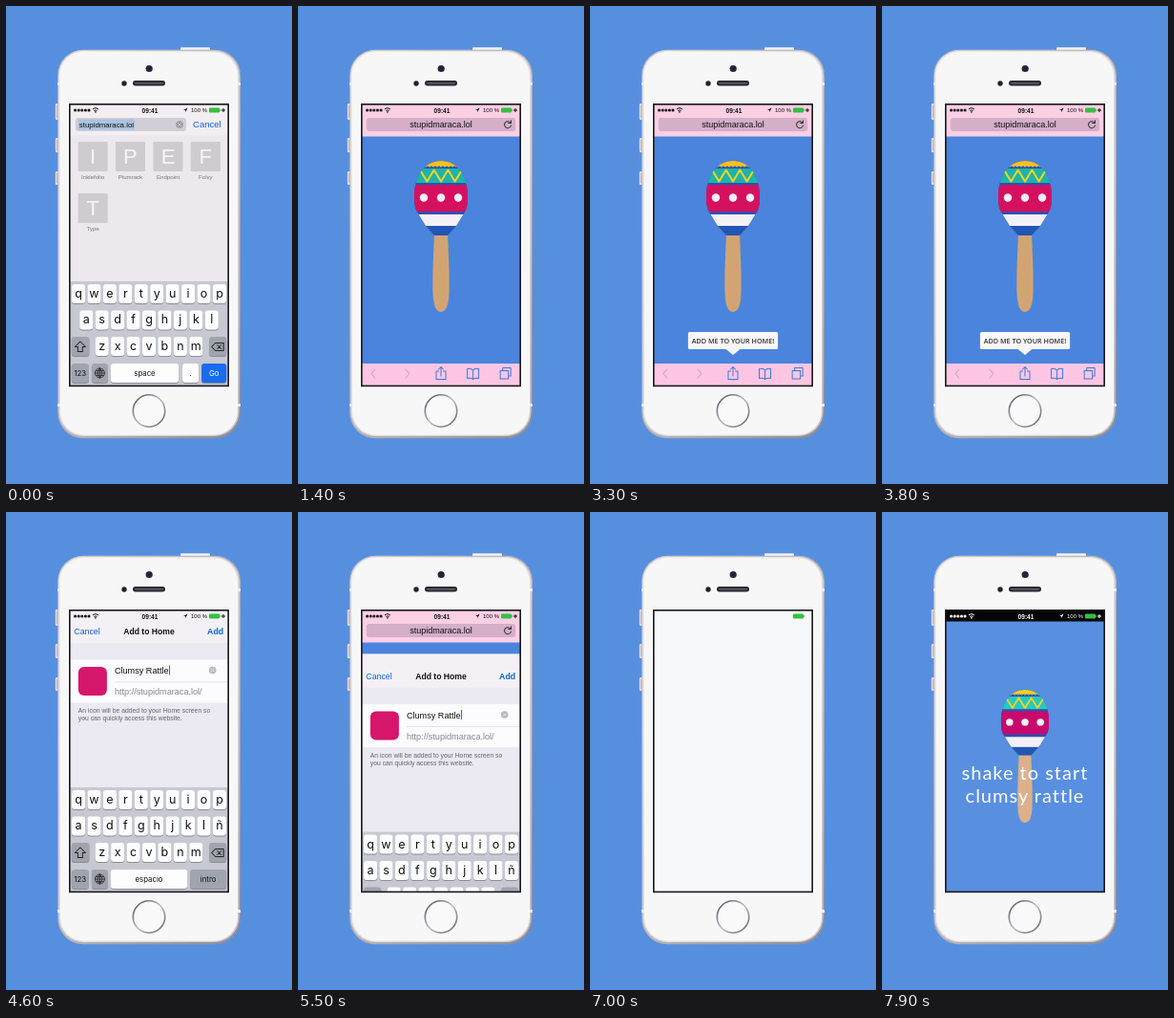
Write an HTML page that moves like this. It is 300 px wide and 500 px high and loops after 8 s.

```html
<!DOCTYPE html>
<html lang="en">
<head>
<meta charset="utf-8">
<title>Add to home</title>
<style>
html, body { margin: 0; width: 100%; height: 100%; overflow: hidden; background: #578fdf; }
svg { display: block; width: 300px; height: 500px; }
text { font-family: "Liberation Sans", Arial, sans-serif; white-space: pre; }
.mid { text-anchor: middle; }
.line { fill: none; stroke: currentColor; stroke-linecap: round; stroke-linejoin: round; }
.key { font-family: Inter, sans-serif; }
.tip { font: 600 7.2px "Open Sans", sans-serif; }
.hand { font: 20px Lato, sans-serif; letter-spacing: 1px; }
</style>
</head>
<body>
<svg id="stage" viewBox="0 0 300 500"></svg>
<script>
const box = (x, y, w, h, fill, r = 0) =>
  `<rect x="${x}" y="${y}" width="${w}" height="${h}" rx="${r}" fill="${fill}"/>`;
const dot = (x, y, r, fill) => `<circle cx="${x}" cy="${y}" r="${r}" fill="${fill}"/>`;
const path = (d, fill) => `<path d="${d}" fill="${fill}"/>`;
const line = (d, color, width = 1) =>
  `<path class="line" d="${d}" color="${color}" stroke-width="${width}"/>`;
const text = (s, x, y, size, fill = '#111', more = '') =>
  `<text x="${x}" y="${y}" font-size="${size}" fill="${fill}" ${more}>${s}</text>`;
const mid = (s, x, y, size, fill, more = '', kind = '') =>
  text(s, x, y, size, fill, `class="mid ${kind}" ${more}`);
const group = (id, body) => `<g id="${id}">${body}</g>`;
const each = (list, draw) => [...list].map(draw).join('');

const bold = 'font-weight="700"';
const site = 'stupidmaraca.lol';
const iconColor = '#d5166b', browserColor = '#2a86de';
const cols = [91.3, 130.5, 170, 209.2];

function zigzag(x0, x1, top, bottom, step) {
  let d = '';
  for (let x = x0, i = 0; x <= x1; x += step, i++) d += `${i ? 'L' : 'M'}${x} ${i % 2 ? bottom : top}`;
  return d;
}

function clearButton(x, y, fill) {
  return dot(x, y, 3.8, fill) +
    line(`M${x - 1.4} ${y - 1.4}l2.8 2.8m0 -2.8l-2.8 2.8`, '#f2eff3', .8);
}

function keyboard(rows, spaceLabel, spaceEnd, lastKeys) {
  const cap = (x, y, w, fill = '#fdfdfe') =>
    box(x, y + 1, w, 20, '#8b8e97', 3) + box(x, y, w, 20, fill, 3);
  const label = (s, x, y, size, fill) => mid(s, x, y, size, fill, '', 'key');
  const gray = '#a0a4ae';
  return box(66, 288, 168, 110, '#c7c8d1') +
    rows.map((row, r) => each(row, (c, i) => {
      const x = 150 + (i - (row.length - 1) / 2) * 16.4, y = 291 + r * 27.5;
      return cap(x - 7, y, 14) + label(c, x, y + 14, 12.5);
    })).join('') +
    cap(69, 346, 18.5, gray) + line('M78 351l-5.5 5.5h3v5h5v-5h3z', '#222') +
    cap(213, 346, 18, gray) +
    line('M215.5 356.5l4 -4h8.5v8h-8.5zm6 -2l4 4m0 -4l-4 4', '#222') +
    cap(69, 374, 18, gray) + label('123', 78, 387, 7.8) +
    cap(90, 374, 17, gray) +
    line('M93.5 384a5 5 0 1 0 10 0a5 5 0 1 0 -10 0h10M98.5 379v10M98.5 379q-5 5 0 10q5 -5 0 -10M94.5 381.5h8m-8 5h8', '#222', .8) +
    cap(110, 374, spaceEnd - 110) + label(spaceLabel, (110 + spaceEnd) / 2, 387, 7.8) +
    lastKeys.map(([s, x, w, fill, ink]) =>
      cap(x, 374, w, fill || gray) + label(s, x + w / 2, 387, 7.8, ink)).join('');
}

function maraca(cap, teal, pink, wood) {
  return path('M143 238H157C158 262 159 280 158.5 300C158 314 155 320 150 320S142 314 141.5 300C141 280 142 262 143 238Z', wood) +
    '<g clip-path="url(#egg)">' +
    box(120, 160, 60, 82, '#2355b5') +
    box(120, 160, 60, 7, cap) +
    line(zigzag(128, 172, 166.5, 168, 2), cap) +
    box(120, 170, 60, 15, teal) +
    line(zigzag(128.1, 172, 171.5, 183.5, 7.3), '#f5d321', 2) +
    box(120, 188, 60, 26, pink) +
    line(zigzag(121, 180, 187, 188.5, 2), pink) +
    line(zigzag(121, 180, 214, 215.5, 2), pink) +
    each([132, 150, 168], x => dot(x, 200.5, 4.2, '#f6f0f4')) +
    box(120, 218, 60, 12, '#f3f1f6') + '</g>';
}

const status =
  each([0, 1, 2, 3, 4], i => dot(72.6 + i * 3.6, 109, 1.55, 'currentColor')) +
  '<path class="line" d="M91.2 107.6q2.7 -2.2 5.4 0M92.6 109.3q1.3 -1 2.6 0" stroke-width="1"/>' +
  dot(93.9, 110.9, .8, 'currentColor') +
  mid('09:41', 151, 111.5, 6.6, 'currentColor', bold) +
  path('M190.5 106.5l-4.5 2.5h2.3v2.3z', 'currentColor') +
  text('100 %', 194, 111.3, 6, 'currentColor') +
  path('M227.5 107h1v1.5h1.5v1h-1.5v1.5h-1v-1.5h-1.5v-1h1.5z', 'currentColor');

const reload = line('M223 122.5a3.5 3.5 0 1 0 .3 2.5M223.3 119.8v2.8h-2.8', '#333');

const loading = box(66, 102, 168, 296, '#fff') + box(66, 102, 168, 34, '#f1edf1') +
  box(72, 117, 156, 14, '#d8d4dc', 3) + mid(site, 150, 127, 9) + reload +
  '<rect id="progress" x="67" y="134.5" height="1.5" fill="#1a6ff0"/>';

const page = box(66, 102, 168, 296, '#4a84dc') +
  box(66, 102, 168, 34.5, '#fbcfe4') + box(72, 117, 156, 14, '#d5aec8', 3) +
  mid(site, 150, 127, 9) + reload +
  box(66, 374, 168, 24, '#ffc6e3') +
  line('M81 380l-4 4.5l4 4.5M113 380l4 4.5l-4 4.5', '#cb9fbd') +
  line('M147.5 382h-2.5v8.5h10v-8.5h-2.5M150 387v-9.5m-2.5 2.5l2.5 -2.5l2.5 2.5', '#3b78d6') +
  line('M177.5 379.5q4 -1 6 1.5q2 -2.5 6 -1.5v10q-4 -1 -6 1q-2 -2 -6 -1zM183.5 381v9.5', '#3b78d6') +
  line('M212 381.5h8.5v8.5h-8.5zM214.5 381v-2.5h8.5v8.5h-2.5', '#3b78d6') +
  maraca('#fbc01f', '#1fb3ab', '#d5115f', '#d3a473') +
  group('tip', box(103, 341, 94, 18, '#f8f7f8', 1.5) + path('M142 358.5H158L150 365Z', '#f8f7f8') +
    mid('ADD ME TO YOUR HOME!', 150, 352.7, 7.2, '#333', '', 'tip'));

const shortcuts = [['Inklefolio', 0, 0], ['Plumrack', 1, 0], ['Endpoint', 2, 0], ['Folvy', 3, 0], ['Type', 0, 1]];
const start = box(66, 102, 168, 296, '#ece8ee') + box(66, 102, 168, 33.5, '#f3eef2') +
  box(73, 117, 116, 14, '#d2ced7', 3) + box(76, 118.5, 59, 11, '#a9c3df') +
  text(site, 77, 127, 7.85) + clearButton(182, 124, '#9c9aa2') + text('Cancel', 196, 127.3, 9.5, '#0a62e0') +
  shortcuts.map(([name, c, r]) => {
    const x = cols[c], y = 142 + r * 54;
    return box(x - 15.5, y, 31, 31, '#cfcbd0', 1) + mid(name[0], x, y + 23.5, 22, '#f8f5f8') +
      mid(name, x, y + 39.5, 6.1, '#77747b');
  }).join('');
const startKeys = keyboard(['qwertyuiop', 'asdfghjkl', 'zxcvbnm'], 'space', 181,
  [['.', 185, 17, '#fdfdfe'], ['Go', 205, 26, '#176cf0', '#fff']]);

const sheet = box(71, 256, 158, 108, '#eeecf1', 4) +
  each([0, 1], r => each(cols, x => box(x - 13, 267 + r * 48, 26, 26, '#d4d2da', 6))) +
  box(71, 369, 158, 24, '#f8f7fa', 4) + mid('Cancel', 150, 384.5, 10, '#0a62e0');

const form = box(66, 102, 168, 296, '#ebe9f1') + box(66, 102, 168, 35, '#f4f1f6') +
  text('Cancel', 71.5, 128.5, 8.8, '#0b62d6') + mid('Add to Home', 150, 128.5, 8.6, '#111', bold) +
  text('Add', 228, 128.5, 8.8, '#0b62d6', `${bold} text-anchor="end"`) +
  box(66, 154.5, 168, 45, '#fcfbfd') + box(76, 162, 30, 30, iconColor, 6) +
  text('Clumsy Rattle', 114, 169, 9.1) + box(171, 160.5, 1, 10, '#2a63d8') + clearButton(216.5, 165.5, '#b9b7be') +
  box(114, 177.5, 120, .7, '#dddbe1') + text(`http://${site}/`, 114, 191.5, 9.1, '#88868e') +
  text('An icon will be added to your Home screen so', 76, 210.5, 6.8, '#66646b') +
  text('you can quickly access this website.', 76, 218.3, 6.8, '#66646b') +
  keyboard(['qwertyuiop', 'asdfghjklñ', 'zxcvbnm'], 'espacio', 190, [['intro', 193, 38]]);

const dock = [['Roamer'], ['Mail', '#166df0'], ['Keyring', '#a3a4aa'], ['Music', '#d0ced6']];
const home = box(60, 90, 180, 320, '#1d1b1f') + box(60, 340, 180, 70, '#252327') +
  dock.map(([name, fill], i) =>
    (fill ? box(cols[i] - 15.5, 353.5, 31, 31, fill, 7) : dot(cols[i], 369, 14.5, browserColor)) +
    mid(name, cols[i], 392, 5.8, '#eee')).join('') +
  '<circle class="line" cx="137.8" cy="336.2" r="1.4" color="#38363b" stroke-width=".7"/>' +
  line('M138.9 337.3l1.2 1.2', '#38363b', .7) +
  dot(146, 336.7, 1.9, '#302e33') + dot(154, 336.7, 1.9, '#48464b') + dot(162, 336.7, 1.9, '#302e33') +
  box(cols[0] - 15.5, 120.5, 31, 31, iconColor, 7) + mid('Clumsy Rattle', cols[0], 159, 5.4, '#eee');

const app = box(66, 102, 168, 296, '#588fe0') + box(66, 102, 168, 12.5, '#050507') +
  '<g transform="translate(150 186) scale(.9 .88) translate(-150 -162)">' +
  maraca('#f2d01c', '#2ac8c0', '#c80a6c', '#dbb08a') + '</g>' +
  '<text class="mid hand" x="150" y="280" fill="#fff">shake to start</text>' +
  '<text class="mid hand" x="150" y="304" fill="#fff">clumsy rattle</text>';

const body = box(183, 43.3, 31, 3, '#f3f1f3', 1) +
  each([[102, 17], [138, 15], [173, 14]], ([y, h]) => box(51.8, y, 3, h, '#e6dedd', 1) + box(53.2, y + 2, 1, h - 4, '#b5abab')) +
  box(54.3, 45.7, 191.7, 406.6, 'url(#edge)', 27) + box(55.6, 46.9, 189, 403.2, 'url(#bevel)', 26) +
  box(57, 48.2, 186, 400.5, '#f7f7f8', 25) +
  each([80, 416], y => box(54, y, 3, 3, '#f1eff1') + box(243, y, 3, 3, '#f1eff1')) +
  dot(150.2, 65.5, 3.6, '#25253a') + dot(124, 81, 2.7, '#22222c') +
  box(133, 78, 34, 5.5, '#26262e', 2.7) + box(135, 79.7, 30, 2, '#55555f', 1) +
  '<circle cx="150" cy="423.5" r="16.7" fill="#f9f9fa" stroke="url(#ring)" stroke-width="1.6"/>';

const gradient = (id, ...colors) => `<linearGradient id="${id}" x2="1" y2="1">` +
  colors.map((c, i) => `<stop offset="${i / (colors.length - 1)}" stop-color="${c}"/>`).join('') + '</linearGradient>';

document.getElementById('stage').innerHTML = `<defs>
  <clipPath id="screen"><rect x="66.8" y="102.8" width="166.4" height="294.6"/></clipPath>
  <clipPath id="egg"><path d="M122 200C122 176 134 162 150 162S178 176 178 200C178 210 176 214 174 217L166 230L157 240H143L134 230L126 217C124 214 122 210 122 200Z"/></clipPath>` +
  gradient('edge', '#d3cdce', '#bbb5b7', '#8f8b91') + gradient('bevel', '#f4f1f2', '#e2dfe2', '#c9c6ca') +
  gradient('ring', '#45434a', '#bdbac0', '#5a5860') +
  '</defs>' + box(0, 0, 300, 500, '#578fdf') + body +
  '<g clip-path="url(#screen)">' +
  group('home', home) + '<rect id="splash" fill="#f7f8fb"/>' +
  group('safari', group('loading', loading) + group('page', page) + group('start', start) +
    group('keys', startKeys) + group('sheet', sheet) + group('form', form)) +
  `<circle id="cover" fill="${browserColor}"/>` +
  group('app', app) + group('status', status) +
  box(213, 106.5, 11, 5, '#35c043', 1) + box(224.3, 108, .9, 2, '#35c043') +
  '</g><rect x="66.8" y="102.8" width="166.4" height="294.6" fill="none" stroke="#18171c" stroke-width="1.6"/>';

const $ = id => document.getElementById(id);
const set = (id, attrs) => { for (const k in attrs) $(id).setAttribute(k, attrs[k]); };
const seg = (t, a, b) => Math.min(1, Math.max(0, (t - a) / (b - a)));
const ease = (t, a, b) => { const u = seg(t, a, b); return u * u * (3 - 2 * u); };
const mix = (a, b, p) => a + (b - a) * p;
const slide = (id, y) => set(id, { transform: `translate(0 ${y})` });

// Zoom between the home grid (p = 0) and one icon filling the screen (p = 1).
// Returns the box of the window that grows out of that icon.
function zoom(x, y, p) {
  const scale = mix(1, 5.4, p), size = 31 * scale, cx = mix(x, 150, p);
  set('home', {
    transform: `translate(${cx} ${mix(y, 250, p ** 1.5)}) scale(${scale}) translate(${-x} ${-y})`
  });
  return { cx, cy: mix(y, 250, p ** 1.2), w: size, h: mix(size, 295, p * p) };
}

function draw(t) {
  set('start', { opacity: 1 - seg(t, 500, 800) });
  slide('keys', 112 * ease(t, 400, 800));
  set('progress', { width: 166 * ease(t, 600, 1300) });
  set('page', { opacity: seg(t, 1000, 1300) });
  set('tip', { opacity: seg(t, 1700, 2000) });
  slide('sheet', 145 * (1 - ease(t, 3800, 4100)));
  set('sheet', { opacity: t < 4500 ? 1 : 0 });
  slide('form', 298 * (1 - ease(t, 4200, 4500) + ease(t, 5400, 5800)));

  const close = (1 - seg(t, 5900, 6500)) ** 2.35;
  const open = ease(t, 6700, 7000);
  const launching = t >= 6700;
  const r = launching ? zoom(cols[0], 136, open) : zoom(cols[0], 369, close);
  set('safari', {
    opacity: Math.min(1, close * 5),
    transform: `translate(${r.cx} ${r.cy}) scale(${r.w / 167} ${r.h / 295}) translate(-150 -250)`
  });
  set('cover', {
    cx: r.cx, cy: r.cy, r: r.w * .47,
    opacity: close > 0 ? Math.max(0, 1 - close * 1.5) : 0
  });
  set('splash', {
    x: r.cx - r.w / 2, y: r.cy - r.h / 2, width: r.w, height: r.h,
    rx: 7 * (1 - open), opacity: launching ? seg(t, 6700, 6850) : 0
  });
  const ready = seg(t, 7100, 7400);
  set('app', { opacity: ready });
  set('status', {
    color: t < 5950 ? '#111' : '#fff',
    opacity: t < 5950 ? 1 : launching ? Math.max(1 - open, ready) : Math.max(0, 1 - close * 3.5)
  });
}

function tick() {
  draw(Math.floor(performance.now() % 8000 / 100) * 100);
  requestAnimationFrame(tick);
}
tick();
</script>
</body>
</html>
```
